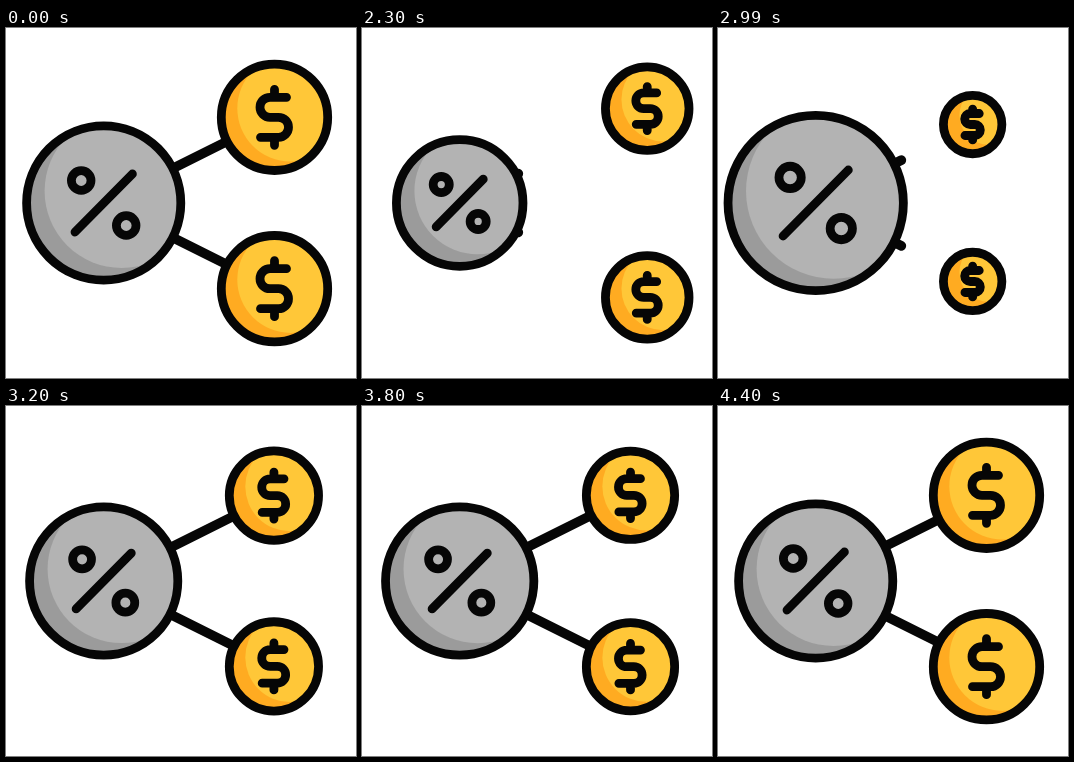
An HTML page with a canvas for the animation above (4.43 s loop, 350 px wide and 350 px high).

```html
<!DOCTYPE html>
<html lang="en">
<head>
<meta charset="utf-8">
<title>Profit sharing</title>
<style>
  html, body { margin: 0; width: 100%; height: 100%; overflow: hidden; background: #fff; }
  canvas { display: block; width: 350px; height: 350px; }
</style>
</head>
<body>
<canvas id="stage" width="350" height="350"></canvas>
<script>
const ctx = document.getElementById('stage').getContext('2d');

const LOOP = 4430, START = 2030, STEP = 30;
const INK = '#060606', STROKE = 8.8, LINE_WIDTH = 9.6;
const HUB = { x: 97.7, y: 175, r: 77.1, base: '#9b9b9b', light: '#b3b3b3', shift: [18, -12] };
const COIN = { r: 53.2, base: '#ffab21', light: '#ffc738', shift: [16, -9] };
const COIN_X = 268.5, PATH_X = 103.7, PATH_SLOPE = 0.52;
const DIR = { x: 0.894, y: 0.447 };
const LINE_FROM = 50, LINE_HIDDEN = 60, LINE_TO = 155;

const clamp = v => Math.min(1, Math.max(0, v));
const progress = (t, a, b) => clamp((t - a) / (b - a));
const smooth = u => (1 - Math.cos(Math.PI * u)) / 2;
const mix = (a, b, u) => a + (b - a) * u;

// Smooth interpolation through [time, value] pairs.
function track(keys, t) {
  if (t <= keys[0][0]) return keys[0][1];
  for (let i = 1; i < keys.length; i++) {
    const [t0, v0] = keys[i - 1], [t1, v1] = keys[i];
    if (t < t1) return mix(v0, v1, smooth(progress(t, t0, t1)));
  }
  return keys[keys.length - 1][1];
}

const HUB_SCALE = [[2030, 1], [2510, 0.7], [2950, 1.143], [3430, 0.802], [3950, 1]];
const COIN_POP = [[2950, 0.54], [3450, 1.138], [3800, 0.83], [4090, 1.015], [4300, 1]];

function disc(style, x, y, scale, drawSign) {
  if (scale < 0.01) return;
  const circle = new Path2D();
  circle.arc(0, 0, style.r, 0, Math.PI * 2);
  ctx.save();
  ctx.translate(x, y);
  ctx.scale(scale, scale);
  ctx.fillStyle = style.base;
  ctx.fill(circle);
  // The shade and the outlines keep their thickness whatever the scale.
  ctx.save();
  ctx.clip(circle);
  ctx.translate(...style.shift.map(v => v / scale));
  ctx.fillStyle = style.light;
  ctx.fill(circle);
  ctx.restore();
  ctx.lineWidth = STROKE / scale;
  ctx.stroke(circle);
  ctx.beginPath();
  drawSign();
  ctx.stroke();
  ctx.restore();
}

function percent() {
  ctx.moveTo(-28.7, 29);
  ctx.lineTo(28.7, -29);
  for (const p of [-22.5, 22.5]) {
    ctx.moveTo(p + 9.8, p);
    ctx.arc(p, p, 9.8, 0, Math.PI * 2);
  }
}

function dollar() {
  const q = Math.PI / 2;
  ctx.moveTo(12, -20);
  ctx.lineTo(-4.5, -20);
  ctx.arc(-4.5, -10, 10, -q, q, true);
  ctx.lineTo(4, 0);
  ctx.arc(4, 10, 10, -q, q);
  ctx.lineTo(-14, 20);
  for (const side of [-1, 1]) {
    ctx.moveTo(0, side * 20);
    ctx.lineTo(0, side * 28);
  }
}

function linePoint(distance, side) {
  return [HUB.x + DIR.x * distance, HUB.y + side * DIR.y * distance];
}

function lineTip(t) {
  return t < 2600
    ? mix(LINE_TO, LINE_HIDDEN, smooth(progress(t, START, 2350)))
    : mix(LINE_HIDDEN, LINE_TO, smooth(progress(t, 2750, 3320)));
}

function leavingCoin(t) {
  const u = progress(t, START, 2613) ** 2;
  return { x: COIN_X + 78 * u, scale: 1 - u };
}

function arrivingCoin(t) {
  const travel = 1 - (1 - progress(t, 2327, 3254)) ** 2;
  const growth = 0.54 * (1 - (1 - progress(t, 2327, 2950)) ** 2.75);
  return { x: mix(HUB.x, COIN_X, travel), scale: t < 2950 ? growth : track(COIN_POP, t) };
}

function draw(t) {
  ctx.fillStyle = '#fff';
  ctx.fillRect(0, 0, 350, 350);
  ctx.strokeStyle = INK;
  ctx.lineCap = ctx.lineJoin = 'round';

  const tip = lineTip(t);
  const coins = [leavingCoin(t), arrivingCoin(t)];
  for (const side of [-1, 1]) {
    if (tip > LINE_HIDDEN) {
      ctx.lineWidth = LINE_WIDTH;
      ctx.beginPath();
      ctx.moveTo(...linePoint(LINE_FROM, side));
      ctx.lineTo(...linePoint(tip, side));
      ctx.stroke();
    }
    for (const { x, scale } of coins) {
      disc(COIN, x, HUB.y + side * PATH_SLOPE * (x - PATH_X), scale, dollar);
    }
  }
  disc(HUB, HUB.x, HUB.y, track(HUB_SCALE, t), percent);
}

const origin = performance.now();
function frame() {
  const t = (performance.now() - origin) % LOOP;
  draw(t < START ? START : START + Math.floor((t - START) / STEP) * STEP);
  requestAnimationFrame(frame);
}
frame();
</script>
</body>
</html>
```
